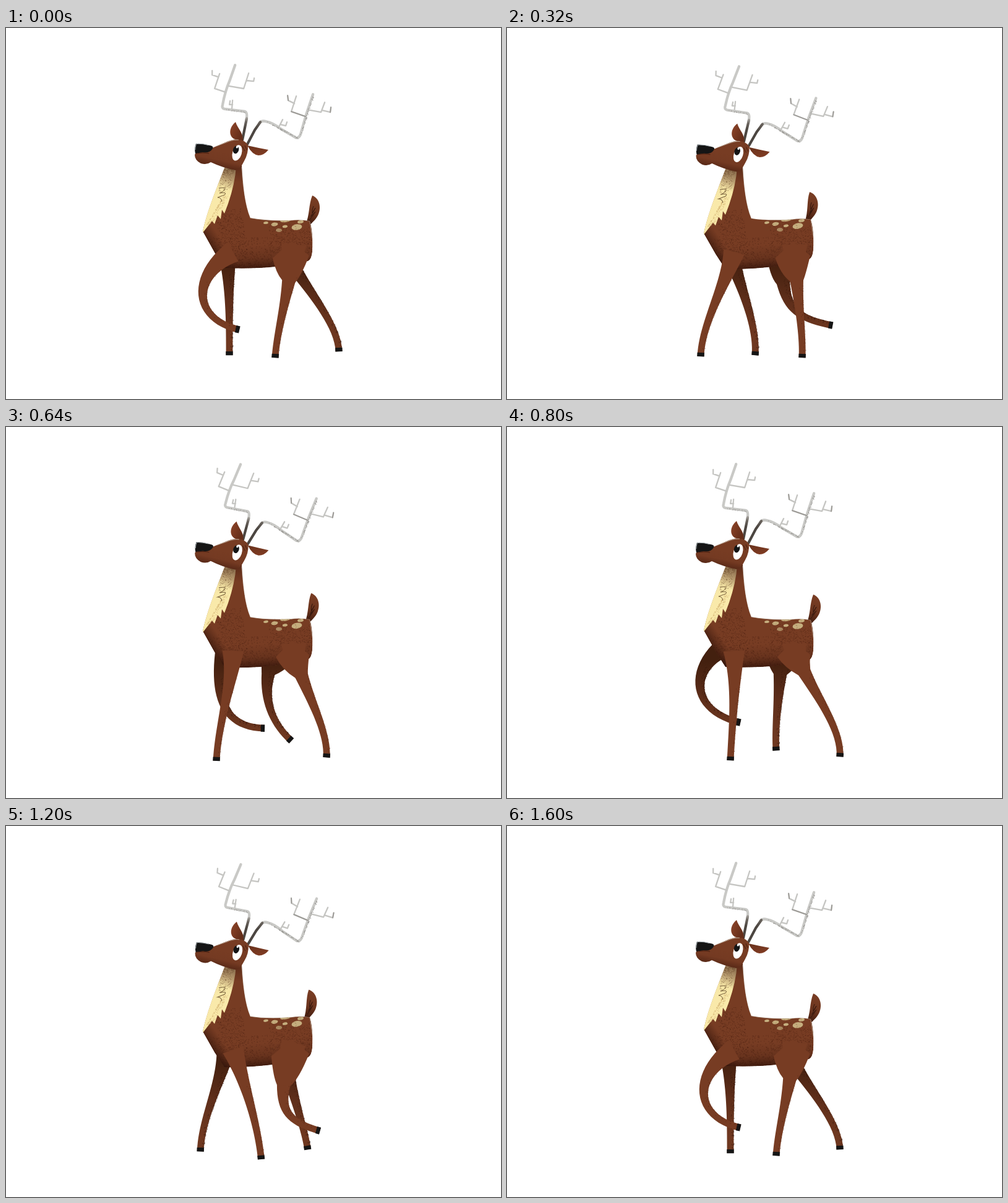
An HTML page with a canvas that plays this animation: 800 by 600 pixels, repeating every 1640 ms.

```html
<!DOCTYPE html>
<html lang="en">
<head>
<meta charset="utf-8">
<title>Walking deer</title>
<style>
html, body { margin: 0; width: 100%; height: 100%; overflow: hidden; background: #fff; }
canvas { display: block; }
</style>
</head>
<body>
<canvas id="stage" width="800" height="600"></canvas>
<script>
const ctx = document.getElementById('stage').getContext('2d');
const LOOP = 1640, STEP = 40, CYCLE = 1600;
const BROWN = '#773c23', DARK = '#3c190d', BLACK = '#151515';

// Each key: time, two curve handles, hoof tip.
const FRONT = [
  [0, 300, 400, 300, 470, 377, 488],
  [240, 295, 402, 308, 479, 331, 521],
  [320, 352, 417, 315, 478, 313, 531],
  [480, 359, 418, 324, 482, 321, 539],
  [800, 370, 420, 364, 480, 361, 539],
  [1040, 377, 430, 396, 480, 391, 539],
  [1120, 382, 418, 408, 488, 401, 539],
  [1280, 385, 420, 400, 481, 424, 534],
  [1360, 367, 448, 376, 505, 434, 508]
];
const HIND = [
  [0, 459, 421, 438, 485, 435, 533],
  [240, 464, 418, 476, 488, 466, 533],
  [320, 466, 418, 479, 488, 477, 533],
  [480, 470, 416, 497, 490, 498, 533],
  [800, 465, 395, 542, 474, 538, 533],
  [920, 468, 400, 530, 498, 554, 520],
  [1040, 470, 408, 497, 496, 547, 498],
  [1120, 456, 456, 461, 477, 526, 491],
  [1280, 415, 435, 426, 474, 490, 498],
  [1360, 406, 426, 421, 475, 478, 508]
];
const TAIL = [[0, 0], [320, -4], [480, 14], [640, -1], [800, 0], [1040, -3], [1360, -3]];

const rnd = i => { const v = Math.sin(i * 12.9898) * 43758.5453; return v - Math.floor(v); };
const wave = p => (1 - Math.cos(p / 800 * 2 * Math.PI)) / 2;

// Periodic Hermite interpolation of every column after the time.
function pose(keys, time) {
  const n = keys.length, t = (time + CYCLE) % CYCLE;
  const key = k => {
    const row = keys[(k + n) % n];
    return [row[0] + Math.floor(k / n) * CYCLE, ...row.slice(1)];
  };
  let i = n - 1;
  while (keys[i][0] > t) i--;
  const [z, a, b, c] = [i - 1, i, i + 1, i + 2].map(key);
  const d = b[0] - a[0], u = (t - a[0]) / d, u2 = u * u, u3 = u2 * u;
  return a.slice(1).map((v, j) => {
    const k = j + 1;
    const m0 = (b[k] - z[k]) / (b[0] - z[0]) * d, m1 = (c[k] - a[k]) / (c[0] - a[0]) * d;
    return (2 * u3 - 3 * u2 + 1) * v + (u3 - 2 * u2 + u) * m0 + (3 * u2 - 2 * u3) * b[k] + (u3 - u2) * m1;
  });
}

function fill(d, style) {
  ctx.fillStyle = style;
  ctx.fill(new Path2D(d));
}
function line(d, style, width) {
  ctx.strokeStyle = style;
  ctx.lineWidth = width;
  ctx.stroke(new Path2D(d));
}
function oval(x, y, rx, ry, style, turn = 0) {
  ctx.fillStyle = style;
  ctx.beginPath();
  ctx.ellipse(x, y, rx, ry, turn, 0, 7);
  ctx.fill();
}
function fade(x0, y0, x1, y1, ...stops) {
  const g = ctx.createLinearGradient(x0, y0, x1, y1);
  stops.forEach((c, i) => g.addColorStop(i / (stops.length - 1), c));
  return g;
}
function grain(count, style, place) {
  ctx.fillStyle = style;
  for (let i = 1; i <= count; i++) {
    const [x, y] = place(rnd(i), rnd(i + 5000));
    ctx.fillRect(x, y, 1, 1);
  }
}
function turned(x, y, degrees, draw) {
  ctx.save();
  ctx.translate(x, y);
  ctx.rotate(degrees * Math.PI / 180);
  ctx.translate(-x, -y);
  draw();
  ctx.restore();
}

function leg(keys, time, far, hind) {
  const p = pose(keys, time);
  let x = [hind ? 465 : 367, p[0], p[2], p[4]], y = [hind ? 350 : 362, p[1], p[3], p[5]];
  if (far) {
    const shift = hind ? [20, 16, 6, 0] : [10, 9, 3, 0];
    x = x.map((v, i) => v - shift[i]);
    y = y.map(v => v - 10);
  }
  const at = (v, t) => { const s = 1 - t; return s*s*s*v[0] + 3*s*s*t*v[1] + 3*s*t*t*v[2] + t*t*t*v[3]; };
  const slope = (v, t) => { const s = 1 - t; return s*s*(v[1]-v[0]) + 2*s*t*(v[2]-v[1]) + t*t*(v[3]-v[2]); };
  const side = (t, s) => {
    const dx = slope(x, t), dy = slope(y, t), len = Math.hypot(dx, dy) || 1;
    const w = (5.4 + (hind ? 15 : 12) * (1 - t) ** 3) * s;
    return [at(x, t) - dy / len * w, at(y, t) + dx / len * w];
  };
  ctx.fillStyle = far ? fade(0, 380, 0, 500, '#43200f', '#5e2e1a', '#6f3820') : BROWN;
  ctx.beginPath();
  for (let i = 0; i <= 24; i++) ctx.lineTo(...side(i / 24, 1));
  for (let i = 24; i >= 0; i--) ctx.lineTo(...side(i / 24, -1));
  ctx.fill();
  if (hind) {
    const [ax, ay] = side(.29, 1), [bx, by] = side(.29, -1);
    const fx = 431 + (ax - 447) * .25 - (far ? 10 : 0), top = far ? 360 : 372;
    ctx.beginPath();
    ctx.moveTo(fx, top);
    ctx.quadraticCurveTo(fx + (ax - fx) * .35, ay - 12, ax, ay);
    ctx.lineTo(bx, by);
    ctx.quadraticCurveTo((bx + 488) / 2, by - 12, far ? 484 : 490, top - 4);
    ctx.lineTo(462, 345);
    ctx.fill();
  }
  grain(far ? 150 : 60, far ? 'rgba(35,13,6,.45)' : 'rgba(60,25,13,.4)', (a, b) => side(.25 + a * .72, -1 + b * b * .9));
  ctx.save();
  ctx.translate(x[3], y[3]);
  ctx.rotate(Math.atan2(y[3] - y[2], x[3] - x[2]));
  ctx.fillStyle = BLACK;
  ctx.fillRect(-6, -5.7, 6.3, 11.4);
  ctx.restore();
}

function tail(angle) {
  turned(488, 317, angle, () => {
    fill('M484 318C491 303 489 285 495 271C506 275 510 289 505 301C502 309 496 313 490 320Z',
      fade(500, 278, 486, 317, BROWN, '#6c351e', DARK));
    line('M497 288Q494 294 495 299L500 291Q495 300 493 305L500 297Q496 304 490 311', '#35170d', 1);
  });
}

const BODY = 'M354 224C342 255 325 295 318 329L337 363L353 388Q398 390 436 386L488 377' +
  'Q494 374 495 362Q497 330 491 312Q475 309 460 311Q420 312 395 307C386 285 383 255 381 220Z';

function body() {
  ctx.save();
  ctx.clip(new Path2D(BODY));
  fill(BODY, BROWN);
  fill(BODY, fade(395, 352, 397, 392, 'rgba(60,25,13,0)', 'rgba(60,25,13,.25)', 'rgba(45,17,8,.85)'));
  fill(BODY, fade(350, 345, 331, 358, 'rgba(60,25,13,0)', 'rgba(45,17,8,.75)'));
  fill(BODY, fade(0, 222, 0, 250, 'rgba(60,25,13,.5)', 'rgba(60,25,13,0)'));
  grain(900, 'rgba(55,22,11,.4)', (a, b) => [320 + a * 172, 388 - b * b * 50]);
  grain(350, 'rgba(55,22,11,.4)', (a, b) => [336 + a * 45 + b * 8, 290 + b * 70]);
  grain(350, 'rgba(55,22,11,.35)', (a, b) => [425 + a * 70, 318 + b * 45]);
  fill('M350 222L372 224Q370 252 359 284L353 300L349 294L347 309L342 303L337 317L333 312L318 331L310 330Z',
    fade(366, 228, 348, 276, '#88694a', '#b79b6f', '#f6e6a6', '#f9e9aa'));
  grain(170, 'rgba(105,72,42,.55)', (a, b) => [353 + a * 18 - b * 10, 228 + b * b * 36]);
  grain(150, 'rgba(205,170,105,.65)', (a, b) => [352 - b * 28 + a * a * 8, 270 + b * 48]);
  line('M344 259Q355 257 354 261Q351 265 345 267Q359 265 353 270L342 274Q348 274 349 281', '#77603c', 1);
  [[420, 315, 4, 2], [434, 317.5, 5.5, 3], [452, 311, 9, 3], [451, 321, 4.2, 2.2], [470, 322, 8.5, 4.7],
    [476, 313.5, 5, 2.6]].forEach(s => oval(...s, '#c5ae7e', -.15));
  oval(441, 327, 5, 3, '#a98961');
  grain(70, 'rgba(110,72,40,.5)', (a, b) => [416 + a * 64, 310 + b * 18]);
  line('M381 225C383 255 386 285 395 307Q420 312 460 311Q475 309 491 312L495 340', 'rgba(190,180,165,.55)', 1.3);
  ctx.restore();
}

const BEAMS = 'M388 150Q391 137 386 135L353 131Q348 130 350 124Q354 102 361 86L370 60' +
  'M409 154Q413 149 420 151Q431 153 444 163L468 177Q473 179 476 172L485 140L496 107';
const TINES = 'M355 104L337 98L345 74M342 79L333 76L333 69M360 94L384 98L392 73M389 85L400 86L401 81' +
  'M365 130L366 117M366 124L361 124L362 118' +
  'M484 143L461 135L469 110M466 122L456 117L455 109M487 132L509 136L515 120M511 133L524 136L525 128' +
  'M440 162L447 148M444 156L452 158L454 152';

function antlers() {
  ctx.lineCap = ctx.lineJoin = 'round';
  line(BEAMS, '#c9c9c6', 4.3);
  line(TINES, '#c5c5c2', 2.3);
  line('M455 109L456 117M461 135L484 143M525 128L524 136', '#9b9995', 1.8);
  grain(45, 'rgba(95,92,88,.6)', (a, b) => [476 + a * 20 + b * 2 - 1, 172 - a * 62 + b * 3 - 1]);
  grain(45, 'rgba(110,106,101,.6)', (a, b) => [422 + a * 48 + b * 2, 151 + a * 25 + b * 3]);
  grain(20, 'rgba(110,106,101,.5)', (a, b) => [354 + a * 32, 130 + a * 4 + b * 3]);
  const shade = fade(0, 142, 0, 162, '#bdbbb7', '#69635d', '#4c4641');
  line('M382 181L389 146', shade, 4.2);
  line('M390 188L402 165L411 152', shade, 4.2);
}

function head(sway) {
  turned(386, 188, sway * .6, antlers);
  fill('M383 182C383 168 375 164 371 152C360 161 360 174 368 179Q375 183 383 182Z',
    fade(364, 164, 381, 172, '#843f25', '#642e1a'));
  fill('M390 190Q408 194 424 197Q417 206 408 206Q398 205 390 190Z', fade(403, 190, 407, 207, '#6b331d', '#803c23'));
  fill('M331 195L352 186Q365 180 374 180Q386 181 391 189Q392 203 385 215Q379 228 371 230Q350 226 331 217' +
    'Q324 222 315 219Q305 214 305 205Q306 201 314 201Z', fade(352, 200, 346, 229, BROWN, '#743a22', '#4f2313'));
  line('M340 191L356 185Q367 180 376 181', 'rgba(200,190,175,.75)', 1.2);
  fill('M307 187Q318 187 330 190Q336 191 334 195Q329 203 318 201L306 203Q304 195 307 187Z', BLACK);
  line('M306 197Q306 190 308 187.5Q317 187 327 189.5', '#9aa3a8', 1);
  line('M307 203Q320 201 328 203', '#4a1f10', 1);
  line('M382 191L386 199M386 190L389 197', '#4a2111', 1);
  oval(373.5, 202, 7.4, 13, '#fff', .3);
  oval(371.6, 197, 4.6, 6.4, BLACK, .3);
  oval(373.4, 192.5, 1.6, 2, '#fff', .3);
}

function draw(now) {
  const t = Math.floor(now % LOOP / STEP) * STEP % CYCLE;
  const bob = wave(t), sway = 6.3 * wave(t - 120) - 1.2;
  const tilt = -.037 * bob;
  ctx.fillStyle = '#fff';
  ctx.fillRect(0, 0, 800, 600);
  leg(HIND, t + 800, true, true);
  leg(FRONT, t + 800, true, false);
  ctx.save();
  ctx.translate(-3 * bob, -6 * bob);
  tail(pose(TAIL, t)[0]);
  ctx.restore();
  ctx.save();
  ctx.transform(1, tilt, 0, 1, 0, -tilt * 415);
  body();
  ctx.restore();
  leg(HIND, t, false, true);
  leg(FRONT, t, false, false);
  ctx.save();
  ctx.translate(.5 * bob, 2.8 * bob);
  turned(378, 205, sway * .4, () => head(sway));
  ctx.restore();
}

function tick() {
  draw(performance.now());
  requestAnimationFrame(tick);
}
tick();
</script>
</body>
</html>
```
